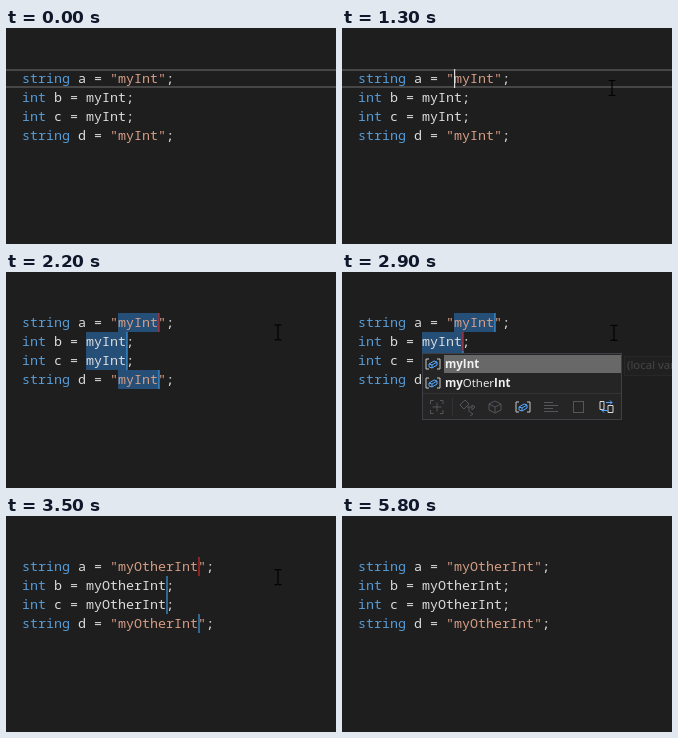
An HTML page for the animation above (5900 ms loop, 330x216 px).

```html
<!DOCTYPE html>
<html lang="en">
<head>
<meta charset="utf-8">
<title>Multi-caret rename</title>
<style>
  html, body { margin: 0; width: 100%; height: 100%; overflow: hidden; background: #1e1e1e; }
  svg { display: block; width: 330px; height: 216px; background: #1e1e1e; }
  text { white-space: pre; }
  .code { font: 13.333px "Noto Sans Mono", "DejaVu Sans Mono", monospace; fill: #dcdcdc; font-variant-ligatures: none; }
  .key { fill: #569cd6; }
  .str { fill: #d69d85; }
  .ui { font: 11.5px "Open Sans", "Noto Sans", sans-serif; fill: #f1f1f1; }
  .b { font-weight: 700; }
  .dim { fill: none; stroke: #55555a; }
</style>
</head>
<body>
<svg viewBox="0 0 330 216">
  <rect id="current" x="-4" y="42" width="338" height="17" fill="none" stroke="#464646" stroke-width="2"/>
  <g id="lines"></g>
  <g id="popup">
    <rect x="80.5" y="81.5" width="199" height="66" fill="#252526" stroke="#3f3f46"/>
    <rect id="choice" x="102" y="83" width="177" height="18" fill="#686868"/>
    <text class="ui b" x="103" y="96">myInt</text>
    <text class="ui" x="103" y="115"><tspan class="b">my</tspan>Other<tspan class="b">Int</tspan></text>
    <path d="M81 121.5H279" stroke="#333337"/>
    <g class="dim">
      <path d="M88.5 132v-3.500h3M98 128.500h3v3.500M101 138v3.500h-3M91.500 141.500h-3v-3.500M90.500 135h9M95 130.500v9"/>
      <path d="M110.500 126v18" stroke="#333337"/>
      <path d="M118 133l5-5 4 4-5 5zM125 135h5M127 135v5M130 133l3 2-3 3zM128 140l3 2-3 2"/>
      <path d="M147 132l6-3 6 3v6l-6 3-6-3zM147 132l6 3 6-3M153 135v6"/>
      <path d="M202 130.500h9M202 133.500h14M202 136.500h9M202 139.500h14"/>
      <rect x="231.500" y="129.500" width="10" height="11"/>
    </g>
    <path d="M262 129.500h-4v8h4zM266 133.500h5v7h-5z" fill="none" stroke="#d8d8d8"/>
    <path d="M264 130.500h6M268 128.500l2 2-2 2M265 138.500h-5M262 136.500l-2 2 2 2" fill="none" stroke="#55aaff"/>
  </g>
  <g id="tip">
    <rect x="282.500" y="84.500" width="70" height="19" fill="#2d2d30" stroke="#4d4d52"/>
    <text class="ui" x="285" y="97">(local variable)</text>
  </g>
  <path id="mouse" d="M-3.500-7.500h2.500l1 1 1-1h2.500M0-6.500v13M-3.500 7.500h2.500l1-1 1 1h2.500" fill="none" stroke="#020202" stroke-width="1.200"/>
</svg>
<script>
const LOOP = 5900, STEP = 100, LEFT = 16, CELL = 8, TOP = 41, ROW = 19;
const OPEN = 2500, DOWN = 3200, COMMIT = 3500;
const $ = id => document.getElementById(id);
const show = (el, on) => el.setAttribute("visibility", on ? "visible" : "hidden");

function add(parent, tag, attrs, text = "") {
  const el = document.createElementNS("http://www.w3.org/2000/svg", tag);
  for (const name in attrs) el.setAttribute(name, attrs[name]);
  el.textContent = text;
  return parent.appendChild(el);
}

// pickAt: when this line's occurrence joins the selection
const lines = [
  { type: "string", name: "a", quote: '"', pickAt: 1500 },
  { type: "int", name: "b", quote: "", pickAt: 1700 },
  { type: "int", name: "c", quote: "", pickAt: 1800 },
  { type: "string", name: "d", quote: '"', pickAt: 2000 }
].map((line, i) => {
  const y = TOP + i * ROW;
  const head = ` ${line.name} = `;
  const start = LEFT + (line.type.length + head.length + line.quote.length) * CELL;
  const selection = add($("lines"), "rect", { x: start, y, width: 5 * CELL + 1, height: ROW, fill: "#264f78" });
  const text = add($("lines"), "text", { class: "code", x: LEFT, y: y + 14 });
  add(text, "tspan", { class: "key" }, line.type);
  add(text, "tspan", {}, head);
  const value = add(text, "tspan", { class: line.quote ? "str" : "" });
  add(text, "tspan", {}, ";");
  const caret = add($("lines"), "rect", { y, width: 1.2, height: ROW });
  return { ...line, start, selection, value, caret };
});

// Bracketed-field icons: two list rows and the active filter
for (const [x, y] of [[91, 92], [91, 111], [181, 135]]) {
  const icon = add($("popup"), "g", { transform: `translate(${x} ${y})`, fill: "none" });
  add(icon, "path", { d: "M-4-5h-3v10h3M4-5h3v10h-3", stroke: "#c8c8c8" });
  add(icon, "path", { d: "M-4 0l5-3 3 1v3l-5 3-3-1zM-4 0l3 1 5-3M-1 1v3", stroke: "#55aaff" });
}

const path = [
  [100, 322, 206], [600, 231, 119], [900, 120, 54], [1100, 115, 52],
  [1200, 229, 58], [1300, 270, 60], [1400, 272, 60],
  [4900, 272, 62], [5400, 236, 226]
];

function mouseAt(t) {
  const next = path.findIndex(p => p[0] > t);
  if (next < 1) return null;
  const [t0, x0, y0] = path[next - 1], [t1, x1, y1] = path[next];
  const k = (t - t0) / (t1 - t0);
  return [x0 + (x1 - x0) * k, y0 + (y1 - y0) * k];
}

function caretOn(t) {
  if (t < 4000) return t >= 1100;
  return (t >= 4600 && t < 5100) || (t >= 5600 && t < 5800);
}

function draw(t) {
  const done = t >= COMMIT, popup = t >= OPEN && !done;
  const word = done ? "myOtherInt" : "myInt";
  const primary = popup ? 1 : 0;

  show($("current"), t < lines[0].pickAt);
  lines.forEach((line, i) => {
    const picked = t >= line.pickAt;
    line.value.textContent = line.quote + word + line.quote;
    show(line.selection, picked && !done);
    show(line.caret, caretOn(t) && (picked || i === 0));
    line.caret.setAttribute("x", line.start + (picked ? word.length * CELL + 0.4 : 0));
    const single = t < lines[1].pickAt;
    line.caret.setAttribute("fill", single ? "#dcdcdc" : i === primary ? "#d02a2a" : "#3d9be0");
  });

  show($("popup"), popup);
  $("choice").setAttribute("y", t < DOWN ? 83 : 102);
  show($("tip"), t >= 2800 && t < DOWN);
  $("tip").setAttribute("opacity", Math.min(1, 0.08 + ((t - 2800) / 300) ** 2));

  const mouse = mouseAt(t);
  show($("mouse"), mouse);
  if (mouse) $("mouse").setAttribute("transform", `translate(${mouse})`);
}

const began = performance.now();
function frame() {
  const t = (performance.now() - began) % LOOP;
  draw(Math.floor(t / STEP) * STEP);
  requestAnimationFrame(frame);
}
draw(0);
requestAnimationFrame(frame);
</script>
</body>
</html>
```
